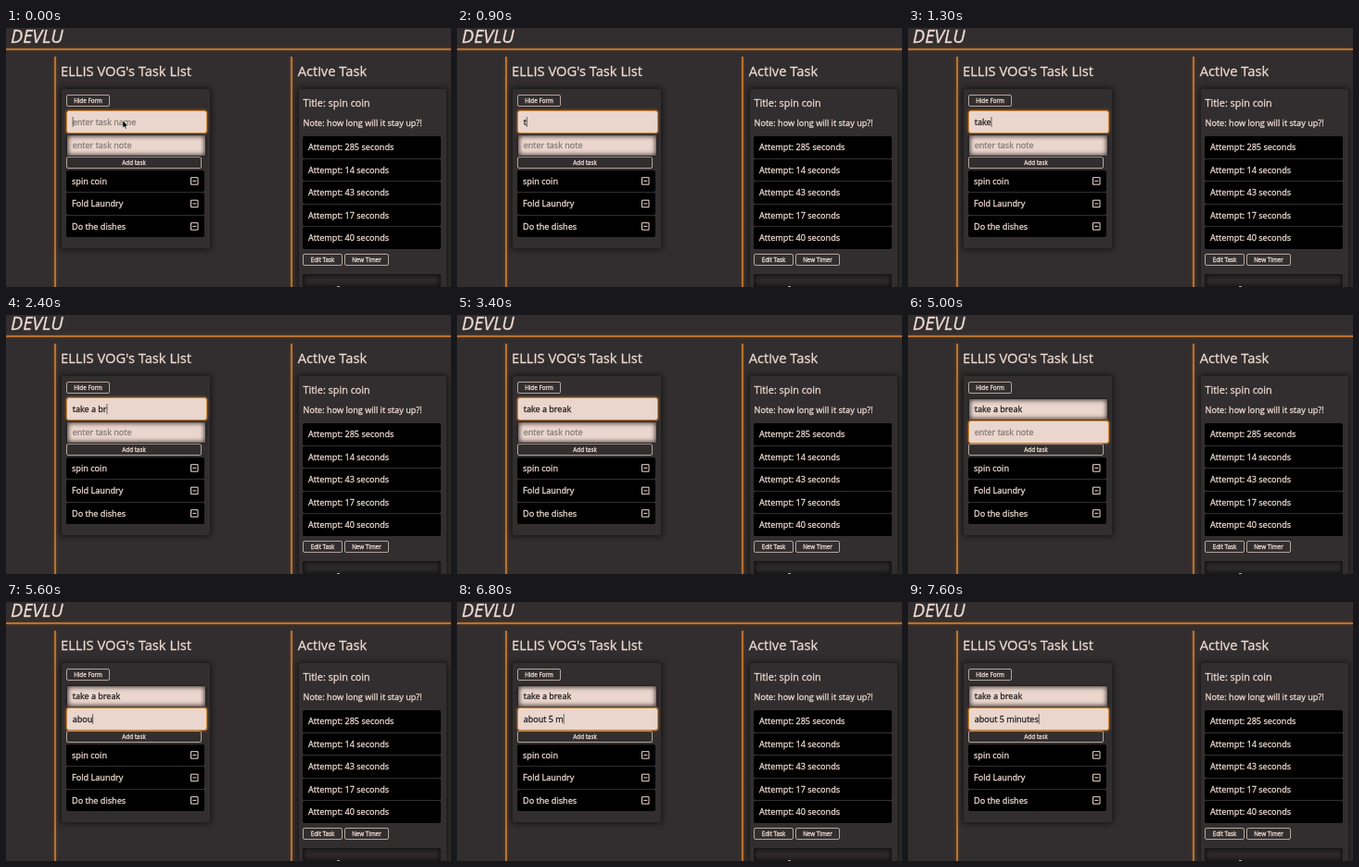
Animation of 480 by 280 pixels, one loop 8 s. Source, as an HTML page:

```html
<!DOCTYPE html>
<html lang="en">
<head>
<meta charset="utf-8">
<title>Task list</title>
<style>
  html, body { margin: 0; width: 100%; height: 100%; overflow: hidden; background: #322e2f; }
  main { position: fixed; inset: 0; overflow: clip; }
  div, svg { position: absolute; box-sizing: border-box; }
  svg { left: 0; top: 0; width: 100%; height: 100%; }
  text {
    font-family: "Open Sans", "Noto Sans", sans-serif; white-space: pre;
    color: #efdbd3; fill: currentColor; stroke: currentColor; stroke-width: 0.28px;
  }
  .rule { background: #b87130; box-shadow: 0 0 3px #74491f; }
  .card { background: #322e2f; border-radius: 2px; box-shadow: 0 0 6px 1px #111; }
  .inner { background: #2d292a; border-radius: 2px; box-shadow: inset 0 0 5px 1px #0c0b0b; }
  .row { background: #000; border-radius: 2px; }
  .button { border: 1px solid #b3a59f; border-radius: 2px; }
  .input { background: #ead6cd; border-radius: 2px; box-shadow: inset 0 0 5px 1px #3a3231, 0 0 3px #111; }
  .focus { border: 1.5px solid #c98235; border-radius: 3px; box-shadow: 0 0 3px #b87130; }
</style>
</head>
<body>
<main id="stage"><svg id="ink"></svg></main>
<script>
const stage = document.getElementById('stage');
const ink = document.getElementById('ink');

function box(kind, x, y, w, h) {
  const el = document.createElement('div');
  el.className = kind;
  place(el, x, y, w, h);
  stage.insertBefore(el, ink);
  return el;
}

function place(el, x, y, w, h) {
  el.style.cssText = `left:${x}px;top:${y}px;width:${w}px;height:${h}px`;
}

function shape(tag, attrs, content = '') {
  const el = document.createElementNS('http://www.w3.org/2000/svg', tag);
  for (const name in attrs) el.setAttribute(name, attrs[name]);
  el.textContent = content;
  return ink.appendChild(el);
}

function label(x, y, size, content, anchor = 'start') {
  return shape('text', { x, y, 'font-size': size, 'text-anchor': anchor }, content);
}

function button(x, y, w, h, content) {
  box('button', x, y, w, h);
  label(x + w / 2, y + h / 2 + 2.3, 6.3, content, 'middle');
}

function row(x, y, content) {
  box('row', x, y, 148.5, 23.5);
  label(x + 6, y + 15, 9.15, content);
}

// Header and columns
box('rule', 0, 22, 480, 2);
box('rule', 52, 31, 2, 249);
box('rule', 307, 31, 2, 249);
label(5, 16.3, 19.8, 'DEVLU').style.fontStyle = 'italic';
label(59, 52, 14.7, "ELLIS VOG's Task List");
label(314.7, 52, 14.7, 'Active Task');

// Task list
box('card', 59.5, 66, 160, 172);
button(65, 72, 47, 13, 'Hide Form');
button(65, 139, 146, 13, 'Add task');
['spin coin', 'Fold Laundry', 'Do the dishes'].forEach((name, i) => {
  const y = 153.7 + i * 24.5;
  row(65, y, name);
  shape('path', {
    d: `M199.5 ${y + 8}h7.5v7.5h-7.5zM201.3 ${y + 11.7}h4`,
    fill: 'none', stroke: '#efdbd3', 'stroke-linejoin': 'round'
  });
});

// Active task
box('card', 315.5, 66, 159.5, 214);
label(320.5, 85, 10.85, 'Title: spin coin');
label(320.5, 106.3, 9.15, 'Note: how long will it stay up?!');
[285, 14, 43, 17, 40].forEach((n, i) => row(320, 117.2 + i * 24.5, `Attempt: ${n} seconds`));
button(320, 244, 43, 13, 'Edit Task');
button(365, 244, 48, 13, 'New Timer');
box('inner', 320, 266, 149, 14);
shape('rect', { x: 357, y: 279, width: 3, height: 1, fill: '#b9aaa4' });

// Form: each key lands at its listed time in ms
const fields = [
  { y: 90.5, hint: 'enter task name', value: 'take a break', start: -200,
    keys: [800, 1000, 1300, 1300, 1500, 1800, 1900, 2100, 2400, 2500, 2600, 2900] },
  { y: 115.5, hint: 'enter task note', value: 'about 5 minutes', start: 3500,
    keys: [5200, 5400, 5500, 5600, 5700, 5800, 6400, 6600, 6800, 6900, 7100, 7300, 7400, 7500, 7600] }
];
for (const field of fields) {
  field.box = box('input', 66, field.y, 149, 22);
  field.text = label(71.7, field.y + 14.3, 9.05, '');
}
const caret = shape('rect', { width: 0.8, height: 11, fill: '#444' });
const pointer = shape('path', {
  d: 'M125.8 99.8v8.4l1.9-1.7 1.3 2.8 1.4-.6-1.3-2.8h2.6z',
  fill: '#000', stroke: '#fff', 'stroke-width': 0.6
});

function draw() {
  const t = performance.now() % 8000;
  const active = fields[t < 3500 ? 0 : 1];
  for (const field of fields) {
    const typed = field.keys.filter(k => k <= t).length;
    const focused = field === active;
    field.text.textContent = typed ? field.value.slice(0, typed) : field.hint;
    field.text.style.color = typed ? '#211e1e' : '#857a76';
    field.box.className = focused ? 'input focus' : 'input';
    if (focused) place(field.box, 64.5, field.y - 2, 152, 25.5);
    else place(field.box, 66, field.y, 149, 22);
    if (focused) {
      const last = typed ? field.keys[typed - 1] : field.start;
      const width = typed ? field.text.getComputedTextLength() : 0;
      caret.setAttribute('x', 71.7 + width);
      caret.setAttribute('y', field.y + 5.5);
      caret.style.opacity = (t - last) % 1000 < 500 ? 1 : 0;
    }
  }
  pointer.style.opacity = t < 800 ? 1 : 0;
  requestAnimationFrame(draw);
}
draw();
</script>
</body>
</html>
```
